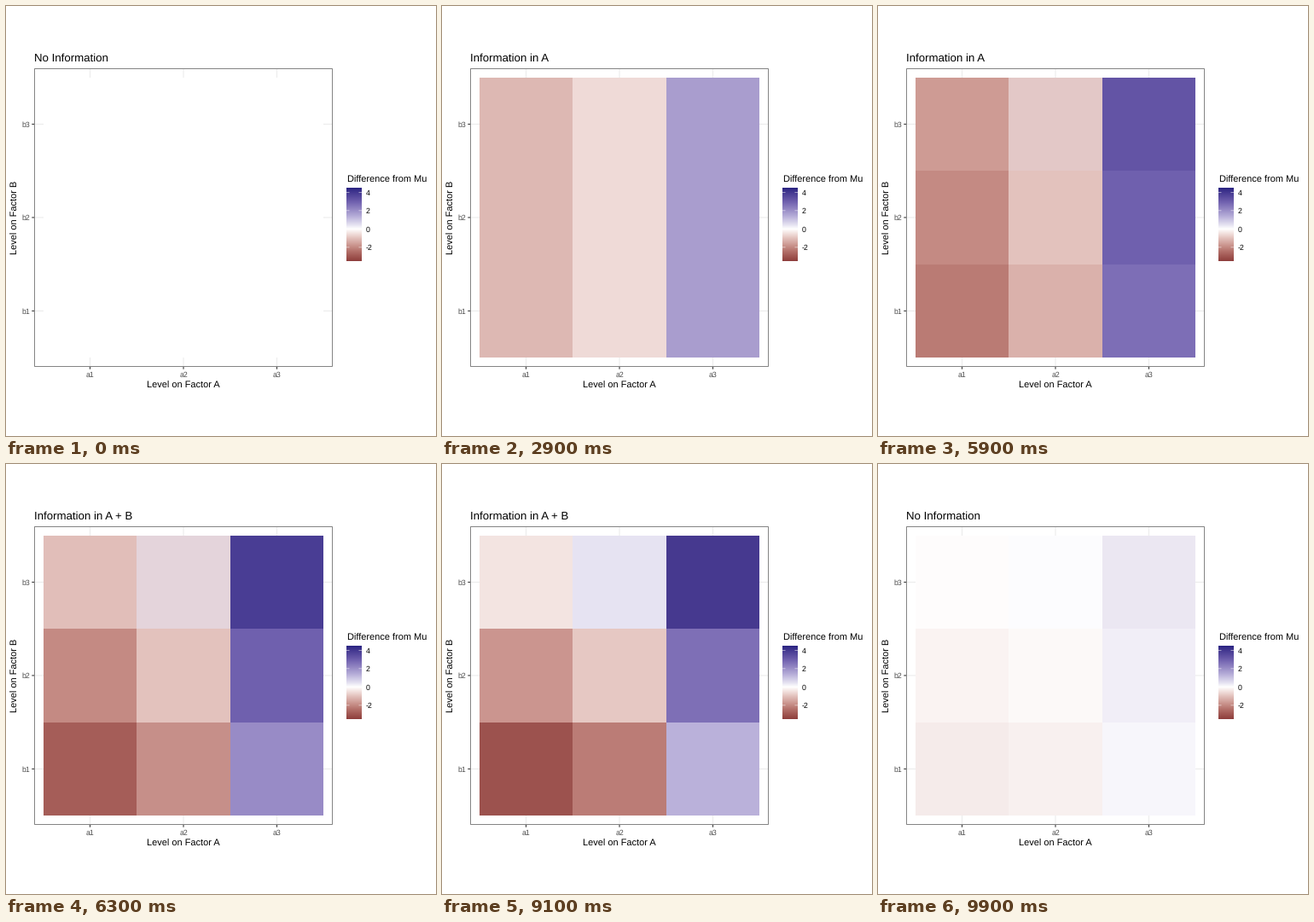
Animation of 504x504 px, one loop 10 s. Source, as a matplotlib script:

```python
import numpy as np
import matplotlib.pyplot as plt
from matplotlib.animation import FuncAnimation
from matplotlib.colors import to_rgb
from matplotlib.patches import Rectangle

plt.rcParams["font.family"] = "Liberation Sans"
plt.rcParams["text.hinting"] = "none"

SIZE = 504
FRAMES, INTERVAL = 100, 100
RAMP = 10                      # frames per transition
STARTS = (23, 57, 90)          # last still frame before each transition
TITLES = ("No Information", "Information in A", "Information in A + B")

# Colour scale: stops along the difference from the grand mean
LEVELS = (-3.5, -2.5, -2, -1, -0.5, 0, 0.5, 1.5, 3, 4.5)
SHADES = ("#8F3F3D", "#B26E68", "#C48A83", "#E3C2BD", "#F2E1DE",
          "#FFFFFF", "#E3E0F0", "#B2A9D6", "#6F60AE", "#2C2683")

TO_XYZ = np.array([[0.4124564, 0.3575761, 0.1804375],
                   [0.2126729, 0.7151522, 0.0721750],
                   [0.0193339, 0.1191920, 0.9503041]])
WHITE = TO_XYZ.sum(axis=1)


def rgb_to_lab(rgb):
    rgb = np.asarray(rgb, float)
    lin = np.where(rgb > 0.04045, ((rgb + 0.055) / 1.055) ** 2.4, rgb / 12.92)
    xyz = lin @ TO_XYZ.T / WHITE
    f = np.where(xyz > 0.008856, np.cbrt(xyz), 7.787 * xyz + 16 / 116)
    x, y, z = np.moveaxis(f, -1, 0)
    return np.stack([116 * y - 16, 500 * (x - y), 200 * (y - z)], axis=-1)


def lab_to_rgb(lab):
    l, a, b = np.moveaxis(np.asarray(lab, float), -1, 0)
    y = (l + 16) / 116
    f = np.stack([y + a / 500, y, y - b / 200], axis=-1)
    xyz = np.where(f > 0.206893, f ** 3, (f - 16 / 116) / 7.787) * WHITE
    lin = np.clip(xyz @ np.linalg.inv(TO_XYZ).T, 0, 1)
    rgb = np.where(lin > 0.0031308, 1.055 * lin ** (1 / 2.4) - 0.055, 12.92 * lin)
    return np.clip(rgb, 0, 1)


STOPS = rgb_to_lab([to_rgb(s) for s in SHADES])


def scale_lab(values):
    return np.stack([np.interp(values, LEVELS, c) for c in STOPS.T], axis=-1)


# Cell effects, rows b1..b3 and columns a1..a3
effect_a = np.tile([-2.0, -1.0, 3.0], (3, 1))
effect_b = np.tile([[-1.5], [0.0], [1.5]], (1, 3))
STATES = [scale_lab(v) for v in (0 * effect_a, effect_a, effect_a + effect_b)]

fig = plt.figure(figsize=(SIZE / 72, SIZE / 72), dpi=72, facecolor="white")
ax = fig.add_axes([0, 0, 1, 1])
ax.axis("off")

LEFT, RIGHT, TOP, BOTTOM = 33, 383, 73, 423
COLS = (44, 153, 263, 372)
ROWS = (412, 303, 193, 84)
X_MID = (98.5, 208, 317.5)
Y_MID = (357.4, 247.9, 138.5)


def line(xs, ys, color, z, width=1.07):
    ax.plot(xs, ys, color=color, lw=width, zorder=z, snap=False,
            solid_capstyle="butt")


def label(x, y, text, size, color="black", **kw):
    return ax.text(x, y, text, fontsize=size, color=color, va="baseline", **kw)


# Grid, ticks and tick labels
for i, (x, y) in enumerate(zip(X_MID, Y_MID), start=1):
    line([x, x], [TOP, BOTTOM], "#EBEBEB", 1)
    line([LEFT, RIGHT], [y, y], "#EBEBEB", 1)
    line([x, x], [BOTTOM, BOTTOM + 2.7], "#333333", 4)
    line([LEFT - 2.7, LEFT], [y, y], "#333333", 4)
    label(x, 435, f"a{i}", 8.8, "#4D4D4D", ha="center")
    label(28.3, y + 3.2, f"b{i}", 8.8, "#4D4D4D", ha="right")

tiles = []
for r in range(3):
    for c in range(3):
        tile = Rectangle((COLS[c], ROWS[r + 1]), COLS[c + 1] - COLS[c],
                         ROWS[r] - ROWS[r + 1], lw=0, fc="white",
                         antialiased=False, zorder=2)
        tiles.append(ax.add_patch(tile))

ax.add_patch(Rectangle((LEFT + 0.5, TOP + 0.5), RIGHT - LEFT - 1,
                       BOTTOM - TOP - 1, fill=False, ec="#848484", lw=1,
                       snap=False, zorder=3))

title = label(33, 65, TITLES[0], 13.2)
label(208, 448, "Level on Factor A", 11, ha="center")
label(14, 248, "Level on Factor B", 11, ha="center", rotation=90,
      rotation_mode="anchor")

# Colour bar
BAR_L, BAR_R, BAR_T, BAR_B = 399, 417, 213, 299
UNIT = (BAR_B - BAR_T) / 8
label(399.5, 207, "Difference from Mu", 11)
bar = lab_to_rgb(scale_lab(np.linspace(4.5, -3.5, BAR_B - BAR_T)))[:, None, :]
ax.imshow(bar, extent=(BAR_L, BAR_R, BAR_B, BAR_T), aspect="auto",
          interpolation="nearest", zorder=2)
for v in (4, 2, 0, -2):
    y = BAR_T + (4.5 - v) * UNIT
    line([BAR_L, BAR_L + 3.5], [y, y], "white", 3, 0.5)
    line([BAR_R - 3.5, BAR_R], [y, y], "white", 3, 0.5)
    label(422, y + 3.2, str(v), 8.8)

ax.set_xlim(0, SIZE)
ax.set_ylim(SIZE, 0)


def progress(frame):
    """Return the current state, the next one and the share between them."""
    state, share = 0, 0
    for i, start in enumerate(STARTS):
        if frame > start:
            state, share = i, min((frame - start) / RAMP, 1)
    return state, (state + 1) % 3, share


def update(frame):
    now, nxt, share = progress(frame)
    lab = STATES[now] * (1 - share) + STATES[nxt] * share
    for tile, color in zip(tiles, lab_to_rgb(lab).reshape(9, 3)):
        tile.set_facecolor(color)
    title.set_text(TITLES[nxt if share > 0.55 else now])
    return tiles + [title]


anim = FuncAnimation(fig, update, frames=FRAMES, interval=INTERVAL,
                     init_func=lambda: update(0), repeat=True, repeat_delay=0)
plt.show()
```
